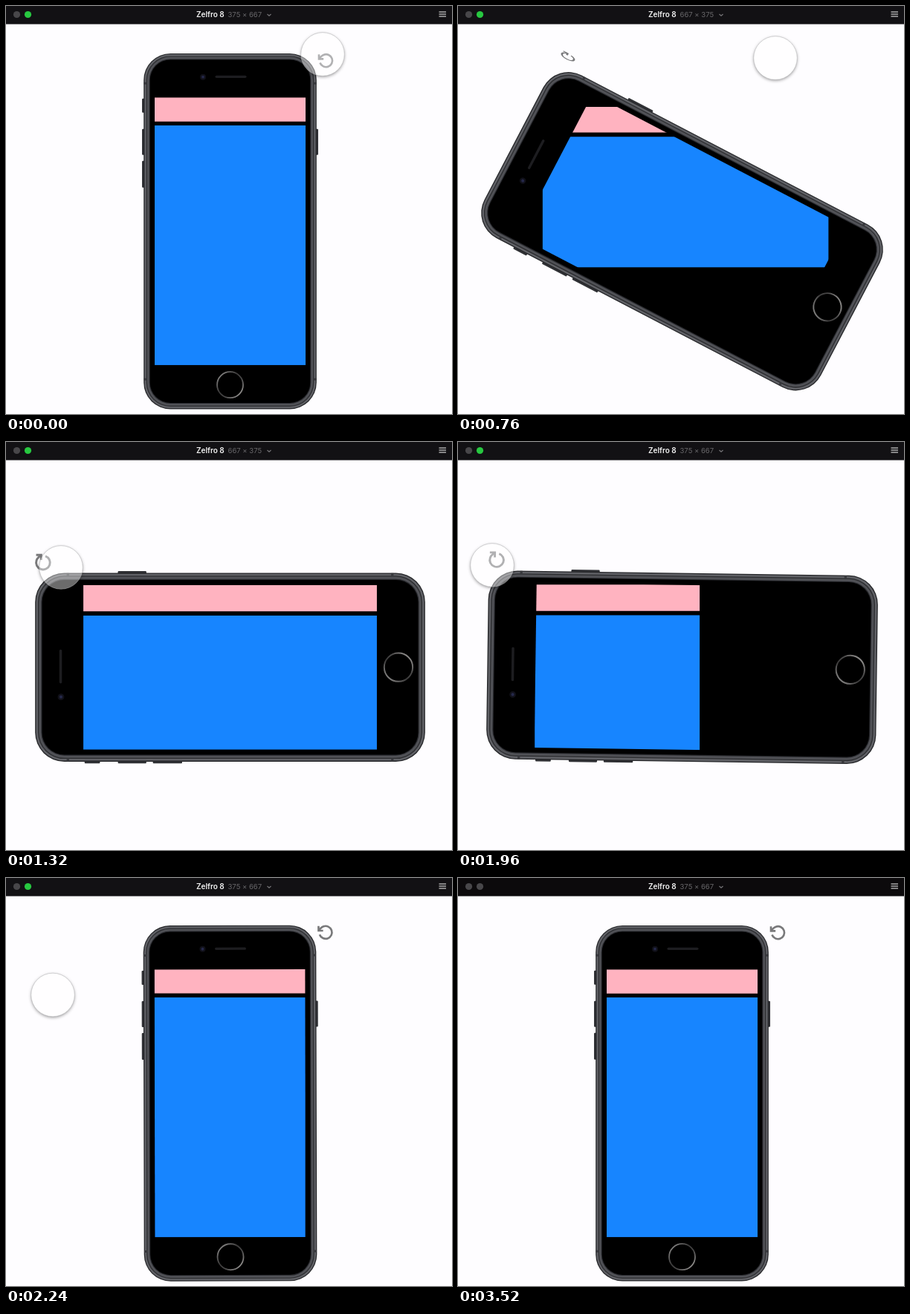
Write an HTML page with a canvas that moves like this. It is 600 px wide and 550 px high and loops after 3.56 s.

```html
<!DOCTYPE html>
<html lang="en">
<head>
<meta charset="utf-8">
<title>Device rotation</title>
<style>
html, body { margin: 0; width: 600px; height: 550px; overflow: hidden; background: #fefdff; }
canvas { display: block; }
</style>
</head>
<body>
<canvas id="stage" width="600" height="550"></canvas>
<script>
const ctx = document.getElementById('stage').getContext('2d');
const LOOP = 3560, STEP = 40, TURN = 310;
const TO_LANDSCAPE = 569, TO_PORTRAIT = 1939, DEACTIVATE = 2760;
const CENTER = { x: 301.5, y: 303.7 };
const SHORT = 203, LONG = 361;
const RAD = Math.PI / 180;

// Pointer stops: time, x, y, opacity
const pointerStops = [
  [0, 426, 65, 1], [520, 427, 71, 1], [800, 427, 70, 1],
  [1130, 62, 167, 1], [1320, 74, 169, 1], [1600, 40, 168, 1],
  [1960, 46, 166, 1], [2240, 63, 157.5, 1], [2560, 138, 116, 1], [2760, 150, 108, 0]
];

const clamp = v => Math.min(1, Math.max(0, v));
const mix = (a, b, k) => a + (b - a) * k;
const smooth = k => k * k * (3 - 2 * k);

// cubic-bezier(.42, 0, .58, 1), solved by bisection
function easeInOut(x) {
  x = clamp(x);
  let lo = 0, hi = 1;
  for (let i = 0; i < 24; i++) {
    const s = (lo + hi) / 2, q = 1 - s;
    if (3 * s * q * (.42 * q + .58 * s) + s * s * s < x) lo = s; else hi = s;
  }
  return smooth((lo + hi) / 2);
}

function circle(x, y, r, color) {
  ctx.fillStyle = color;
  ctx.beginPath();
  ctx.arc(x, y, r, 0, 2 * Math.PI);
  ctx.fill();
}

function rect(x, y, w, h, color, r = 0) {
  ctx.fillStyle = color;
  ctx.beginPath();
  ctx.roundRect(x, y, w, h, r);
  ctx.fill();
}

function line(points, color, width) {
  ctx.strokeStyle = color;
  ctx.lineWidth = width;
  ctx.beginPath();
  points.forEach(([x, y]) => ctx.lineTo(x, y));
  ctx.stroke();
}

function text(str, x, font, color) {
  ctx.font = font;
  ctx.fillStyle = color;
  ctx.fillText(str, x, 14.5);
}

function drawTitleBar(landscape, active) {
  rect(0, 0, 600, 24.5, active ? '#121114' : '#0c0a0c');
  circle(14.5, 11.5, 4.6, '#48474a');
  circle(29.5, 11.5, 4.6, active ? '#27c840' : '#48474a');
  text('Zelfro 8', 256, '600 10px Inter, sans-serif', '#f4f4f4');
  text(landscape ? '667 × 375' : '375 × 667', 298.5, '9.5px Inter, sans-serif', '#68676a');
  line([[351.5, 11], [354, 13.3], [356.5, 11]], '#77767a', 1.2);
  for (const y of [8, 11, 14]) rect(582.5, y - .6, 9.5, 1.2, '#d0d0d0');
}

function drawBody() {
  for (const [y, h] of [[-179, 19], [-138, 35], [-95, 36]]) rect(-118.5, y, 4, h, '#303135', 1);
  rect(114.5, -138, 4, 35, '#303135', 1);
  const shells = [[0, '#242528'], [1.2, '#606166'], [3.5, '#2b2c2f'], [4.7, '#505156'], [7.5, '#25262a'], [8.6, '#000']];
  for (const [inset, color] of shells) {
    rect(-116.3 + inset, -239.8 + inset, 232.6 - 2 * inset, 479.6 - 2 * inset, color, 36 - inset);
  }
  for (const x of [-116, 112]) for (const y of [-201, 198]) rect(x, y, 4, 3, '#37383c');

  rect(-20, -210, 42, 3.2, '#1d1d20', 1.6);
  circle(-36.5, -208, 4, '#111119');
  circle(-36.5, -208, 1.9, '#25284a');

  const shine = ctx.createLinearGradient(-15, 193, 15, 221);
  shine.addColorStop(0, '#8a8988');
  shine.addColorStop(.4, '#3b3a3a');
  shine.addColorStop(.65, '#4a4949');
  shine.addColorStop(1, '#9a9896');
  ctx.strokeStyle = shine;
  ctx.lineWidth = 1.8;
  ctx.beginPath();
  ctx.arc(0, 207, 17.5, 0, 2 * Math.PI);
  ctx.stroke();
}

function drawContent(angle, landscape, progress) {
  const w = landscape ? LONG : SHORT, h = landscape ? SHORT : LONG;
  const heading = (landscape ? -45 - 58.5 * progress : 135 + 58.5 * progress) * RAD;
  const drift = 112 * (1 - Math.pow(progress, 1.9));
  ctx.save();
  ctx.beginPath();
  ctx.rect(-SHORT / 2, -LONG / 2, SHORT, LONG);
  ctx.clip();
  ctx.rotate(-angle);
  ctx.translate(drift * Math.cos(heading) - w / 2, drift * Math.sin(heading) - h / 2);
  rect(0, 0, w, 32.5, '#ffb3c0');
  rect(0, 37.9, w, h - 37.9, '#1785ff');
  ctx.restore();
}

function drawTurnIcon(turn) {
  ctx.save();
  ctx.translate(129, -230);
  ctx.scale(.95 * (1 - 2 * turn), .95);
  ctx.strokeStyle = '#79797b';
  ctx.lineWidth = 2.8;
  ctx.beginPath();
  ctx.arc(0, 0, 9, 160.5 * RAD, -135 * RAD, true);
  ctx.lineTo(-10, -3);
  ctx.stroke();
  line([[-10, -9], [-10, -2.5], [-3.5, -2.5]], '#79797b', 2.8);
  ctx.restore();
}

function drawPointer(t) {
  const i = pointerStops.findIndex(stop => stop[0] > t);
  if (i < 0) return;
  const a = pointerStops[i - 1], b = pointerStops[i];
  const k = smooth((t - a[0]) / (b[0] - a[0]));
  const x = mix(a[1], b[1], k), y = mix(a[2], b[2], k);

  ctx.save();
  ctx.globalAlpha = mix(a[3], b[3], k);
  // Shadow only outside the disc
  ctx.save();
  ctx.beginPath();
  ctx.rect(0, 0, 600, 550);
  ctx.arc(x, y, 29.3, 0, 2 * Math.PI, true);
  ctx.clip('evenodd');
  ctx.shadowColor = 'rgba(0,0,0,.42)';
  ctx.shadowBlur = 4;
  ctx.shadowOffsetY = 1.5;
  circle(x, y, 29, '#fff');
  ctx.restore();
  circle(x, y, 29.3, 'rgba(255,255,255,.42)');
  ctx.strokeStyle = 'rgba(170,170,172,.5)';
  ctx.lineWidth = 1;
  ctx.beginPath();
  ctx.arc(x, y, 29.3, 0, 2 * Math.PI);
  ctx.stroke();
  ctx.restore();
}

function draw(t) {
  const landscape = t >= TO_LANDSCAPE && t < TO_PORTRAIT;
  const start = t < TO_LANDSCAPE ? -LOOP : landscape ? TO_LANDSCAPE : TO_PORTRAIT;
  const progress = easeInOut((t - start) / TURN);
  const turn = landscape ? progress : 1 - progress;
  const angle = -90 * RAD * turn;
  const zoom = 1 + .094 * turn;

  rect(0, 0, 600, 550, '#fefdff');
  ctx.save();
  ctx.translate(CENTER.x, CENTER.y);
  ctx.rotate(angle);
  ctx.scale(zoom, zoom);
  drawBody();
  drawContent(angle, landscape, progress);
  drawTurnIcon(turn);
  ctx.restore();
  drawPointer(t);
  drawTitleBar(landscape, t < DEACTIVATE);
}

const origin = performance.now();
function tick() {
  const t = (performance.now() - origin) % LOOP;
  draw(Math.floor(t / STEP) * STEP);
  requestAnimationFrame(tick);
}
tick();
</script>
</body>
</html>
```
